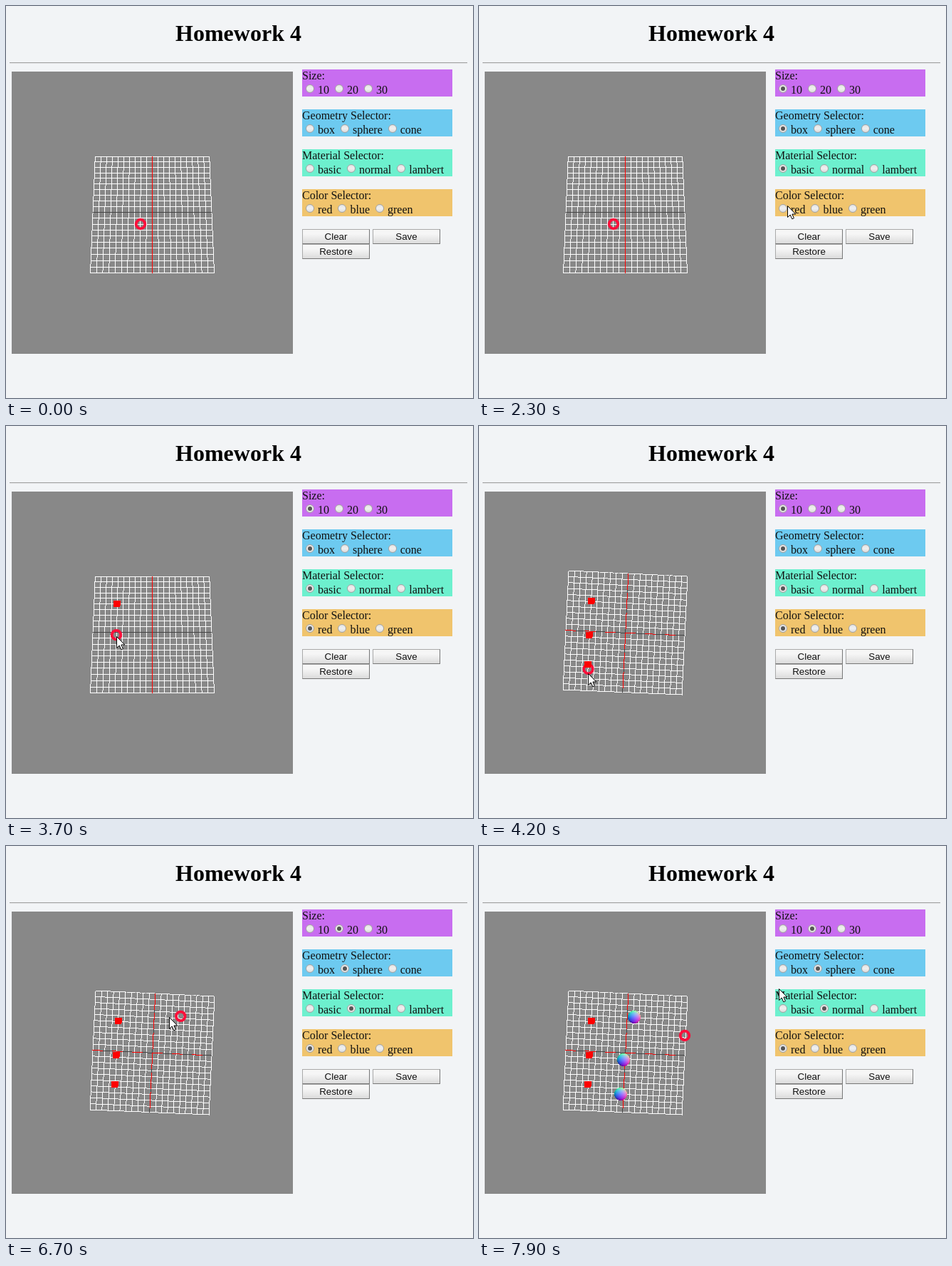
An HTML page with a canvas that plays this animation: 656x550 px, repeating every 8 s.

```html
<!DOCTYPE html>
<html lang="en">
<head>
<meta charset="utf-8">
<title>Homework 4</title>
<style>
  html, body { margin: 0; width: 100%; height: 100%; overflow: hidden; background: #f2f4f6; }
  body { position: relative; color: #111; font: 16px/18px "Liberation Serif", "Times New Roman", serif; }
  h1, hr, .panel, .button, canvas { position: absolute; margin: 0; }
  h1 { left: 5px; top: 20px; width: 643px; color: #000; text-align: center; font-size: 32px; line-height: 37px; }
  hr { left: 5px; top: 79px; width: 643px; height: 1px; border: 0; background: #a0a0a0; border-bottom: 1px solid #e6e7e9; }
  .panel { left: 416px; width: 211px; height: 38px; white-space: nowrap; }
  .row { position: absolute; left: 1px; top: 20px; }
  .radio { display: inline-block; position: relative; width: 13px; height: 1px; margin: 0 3px 0 5px; }
  .radio i { position: absolute; left: -1px; top: -12px; width: 10px; height: 10px; border: 1px solid #a2a2a2;
    border-radius: 50%; background: linear-gradient(#e4e4e4, #f0f0f0 50%, #dcdcdc); }
  .radio.on i::after { content: ""; position: absolute; left: 2px; top: 2px; width: 6px; height: 6px;
    border-radius: 50%; background: #555; }
  .button { box-sizing: border-box; width: 95px; height: 21px; border: 1px solid #a9a9a9;
    border-right-color: #777; border-bottom-color: #777; background: linear-gradient(#f6f6f6 30%, #dcdcdc);
    font: 13.33px/19px "Liberation Sans", Arial, sans-serif; text-align: center; }
  canvas { left: 0; top: 0; }
</style>
</head>
<body>
<h1>Homework 4</h1>
<hr>
<div class="button" style="left:416px;top:313px">Clear</div>
<div class="button" style="left:515px;top:313px">Save</div>
<div class="button" style="left:416px;top:334px">Restore</div>
<canvas width="656" height="550"></canvas>
<script>
const LOOP = 8000, STEP = 100, DWELL = 200, LAG = 60;
const canvas = document.querySelector('canvas'), ctx = canvas.getContext('2d');

const groups = [
  { title: 'Size:', color: '#c86df0', options: ['10', '20', '30'] },
  { title: 'Geometry Selector:', color: '#6dcaf0', options: ['box', 'sphere', 'cone'] },
  { title: 'Material Selector:', color: '#6df0ce', options: ['basic', 'normal', 'lambert'] },
  { title: 'Color Selector:', color: '#f0c46d', options: ['red', 'blue', 'green'] }
];
groups.forEach((group, i) => {
  const panel = document.createElement('div');
  panel.className = 'panel';
  panel.style.cssText = `top:${89 + 56 * i}px;background:${group.color}`;
  panel.innerHTML = group.title + '<div class="row">' +
    group.options.map(o => `<span class="radio"><i></i></span>${o}`).join(' ') + '</div>';
  document.body.insertBefore(panel, canvas);
  group.radios = [...panel.querySelectorAll('.radio')];
});

const pick = (group, option) => ({ group, option });
const box = row => ({ row });
const sphere = { sphere: true };

// pointer stops: time of the click (or of passing by), place, what is clicked
const stops = [
  [100, 575, 94],
  [800, 422, 119, pick(0, 0)],
  [1400, 422, 178, pick(1, 0)],
  [1900, 420, 228, pick(2, 0)],
  [2500, 433, 280, pick(3, 0)],
  [3400, 155, 249, box(0.242)],
  [3900, 155, 295, box(0.529)],
  [4100, 154, 335, box(0.775)],
  [4250, 153, 348],
  [4600, 290, 238],
  [5100, 468, 113, pick(0, 1)],
  [5600, 479, 163, pick(1, 1)],
  [6300, 484, 229, pick(2, 1)],
  [7000, 218, 240, sphere],
  [7250, 203, 300, sphere],
  [7500, 199, 348, sphere],
  [7700, 289, 266],
  [7900, 421, 200]
].map(([time, x, y, action = {}]) => ({ time, x, y, action }));

// grid corners clockwise from the top left, before and after the camera turn
const tilted = [[125.3, 211.3], [285.7, 211.3], [292.5, 374.9], [118.5, 374.9]];
const turned = [[126, 203], [293, 211], [285, 377], [118, 370]];

const mix = (a, b, k) => a + (b - a) * k;
const clamp = k => Math.min(1, Math.max(0, k));
const easeOut = k => 1 - (1 - k) ** 2;

// moves to the next stop and rests there before a click
function pointerAt(t) {
  const i = stops.findIndex(s => s.time > t);
  if (i < 0) return stops[stops.length - 1];
  const b = stops[i], a = stops[i - 1] || b, span = b.time - a.time;
  const rest = 'group' in b.action || 'row' in b.action || b.action.sphere ? Math.min(DWELL, span / 2) : 0;
  const k = span ? easeOut(clamp((t - a.time) / (span - rest))) : 0;
  return { x: mix(a.x, b.x, k), y: mix(a.y, b.y, k) };
}

function cornersAt(t) {
  const k = clamp((t - 3950) / 250);
  return tilted.map((p, i) => p.map((v, j) => mix(v, turned[i][j], k)));
}

// the marker stays where the pointer was last over the grid
function markerAt(t, corners) {
  const area = new Path2D('M' + corners.join('L') + 'Z');
  for (let s = t - LAG; s > 0; s -= 20) {
    const p = pointerAt(s);
    if (ctx.isPointInPath(area, p.x, p.y)) return p;
  }
  return { x: 189, y: 306 };
}

// perspective map from the unit square to a quad
function projector([[x0, y0], [x1, y1], [x2, y2], [x3, y3]]) {
  const dx1 = x1 - x2, dx2 = x3 - x2, dy1 = y1 - y2, dy2 = y3 - y2;
  const sx = x0 - x1 + x2 - x3, sy = y0 - y1 + y2 - y3;
  const det = dx1 * dy2 - dx2 * dy1;
  const g = (sx * dy2 - dx2 * sy) / det, h = (dx1 * sy - sx * dy1) / det;
  return (u, v) => {
    const w = g * u + h * v + 1;
    return [
      ((x1 - x0 + g * x1) * u + (x3 - x0 + h * x3) * v + x0) / w,
      ((y1 - y0 + g * y1) * u + (y3 - y0 + h * y3) * v + y0) / w
    ];
  };
}

// one pixel wide line without smoothing
function line([x0, y0], [x1, y1], color) {
  const n = Math.max(1, Math.round(Math.max(Math.abs(x1 - x0), Math.abs(y1 - y0))));
  ctx.fillStyle = color;
  for (let i = 0; i <= n; i++) {
    ctx.fillRect(Math.floor(mix(x0, x1, i / n)), Math.floor(mix(y0, y1, i / n)), 1, 1);
  }
}

// dark axis, with a share of each dash in red
function drawAxis(at, redShare, dashes = 6) {
  line(at(0), at(1), '#444');
  if (!redShare) return;
  for (let i = 0; i < dashes; i++) line(at(i / dashes), at((i + redShare) / dashes), '#f00');
}

function drawGrid(at, isTurned) {
  for (let i = 0; i <= 20; i++) {
    if (i === 10) continue;
    line(at(i / 20, 0), at(i / 20, 1), '#fff');
    line(at(0, i / 20), at(1, i / 20), '#fff');
  }
  drawAxis(k => at(k, 0.5), isTurned ? 0.5 : 0);
  drawAxis(k => at(0.5, k), isTurned ? 0.8 : 1);
}

function drawMarker({ x, y }) {
  ctx.strokeStyle = '#fb0f3a';
  ctx.lineWidth = 3.8;
  ctx.beginPath();
  ctx.arc(x, y, 6.3, 0, 7);
  ctx.stroke();
}

function drawBox([x, y]) {
  ctx.fillStyle = '#f00';
  ctx.fillRect(Math.round(x) - 5, Math.round(y) - 4, 9, 9);
  ctx.fillRect(Math.round(x) - 4, Math.round(y) - 4, 9, 7);
}

// colours follow the surface normal
function makeBall(r) {
  const tile = document.createElement('canvas'), size = tile.width = tile.height = 2 * r;
  const pen = tile.getContext('2d');
  for (let j = 0; j < size; j++) for (let i = 0; i < size; i++) {
    const x = (i + 0.5) / r - 1, y = 1 - (j + 0.5) / r, d = 1 - x * x - y * y;
    if (d < 0) continue;
    pen.fillStyle = `rgb(${[x, y, Math.sqrt(d)].map(c => Math.round((c + 1) * 127.5))})`;
    pen.fillRect(i, j, 1, 1);
  }
  return tile;
}
const ball = makeBall(9);

const arrow = new Path2D('M.5 .5V16.5L4.2 13L6.8 18.8L9.4 17.7L6.9 12H11.8Z');
const beam = new Path2D('M-2.5 -7.5H-.5L.5 -6.5L1.5 -7.5H3.5M.5 -6.5V6.5M-2.5 7.5H-.5L.5 6.5L1.5 7.5H3.5');

function drawPointer({ x, y }) {
  const overTitle = x > 416 && x < 540 && y >= 89 && (y - 89) % 56 <= 18;
  ctx.save();
  ctx.translate(Math.round(x), Math.round(y));
  ctx.lineWidth = 1;
  ctx.strokeStyle = '#000';
  ctx.fillStyle = '#fff';
  if (!overTitle) ctx.fill(arrow);
  ctx.stroke(overTitle ? beam : arrow);
  ctx.restore();
}

function render(t) {
  const done = stops.filter(s => s.time <= t);
  groups.forEach(({ radios }, g) => {
    const last = done.filter(s => s.action.group === g).pop();
    radios.forEach((radio, i) => radio.classList.toggle('on', !!last && last.action.option === i));
  });

  const corners = cornersAt(t), at = projector(corners);
  ctx.clearRect(0, 0, 656, 550);
  ctx.fillStyle = '#888';
  ctx.fillRect(8, 92, 395, 396);
  drawGrid(at, t > 4000);
  drawMarker(markerAt(t, corners));
  for (const { x, y, action } of done) {
    if (action.row) drawBox(at(0.2, action.row));
    if (action.sphere) ctx.drawImage(ball, x - 9, y - 9);
  }
  if (t >= stops[0].time) drawPointer(pointerAt(t));
}

const start = performance.now();
let shown = -1;
function tick() {
  const t = Math.floor((performance.now() - start) % LOOP / STEP) * STEP;
  if (t !== shown) render(shown = t);
  requestAnimationFrame(tick);
}
tick();
</script>
</body>
</html>
```
